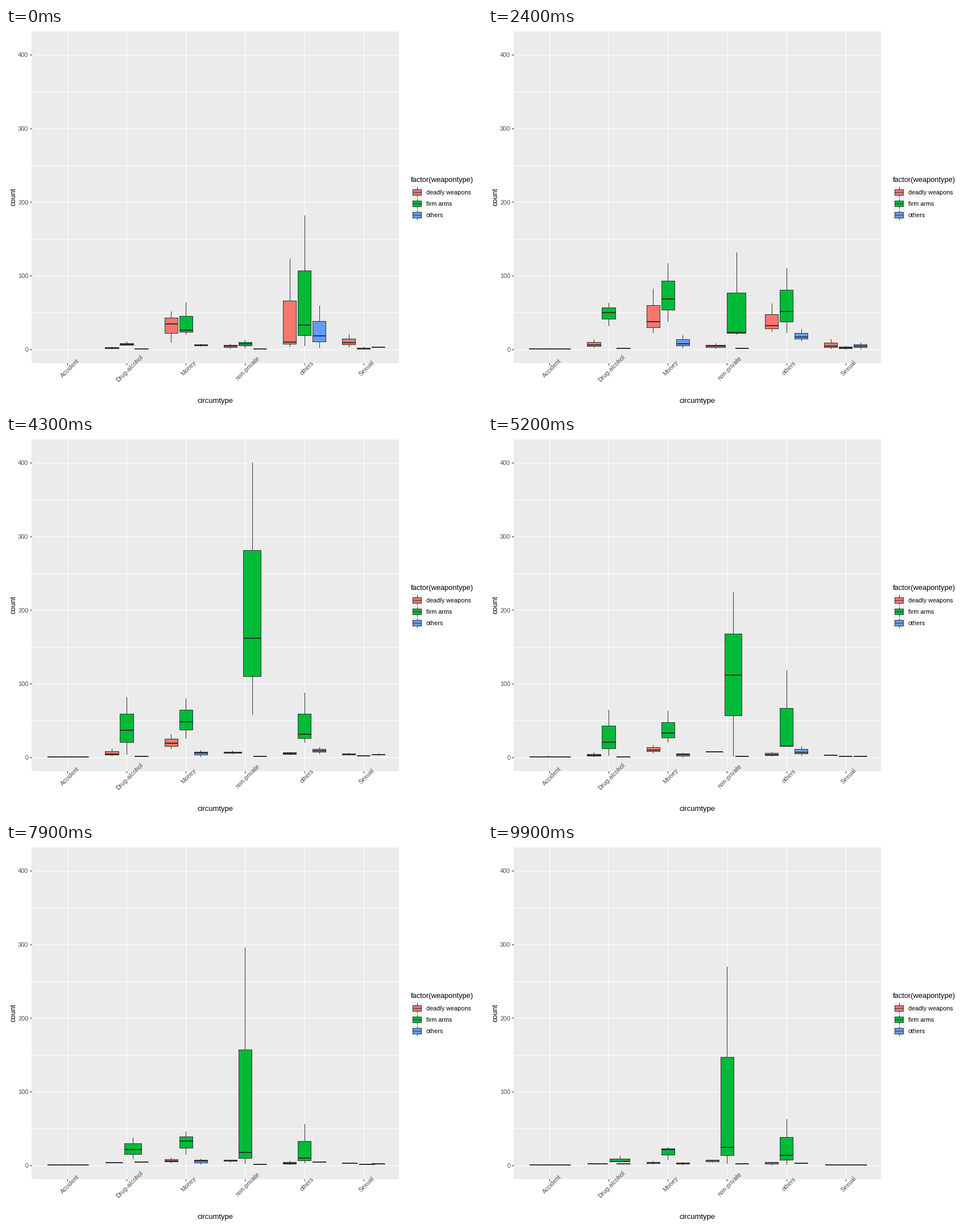
A matplotlib script for the animation above (10000 ms loop, 837 by 669 pixels).

```python
import numpy as np
import matplotlib.pyplot as plt
from matplotlib.animation import FuncAnimation
from matplotlib.patches import Rectangle

W, H, DPI = 837, 669, 72
FRAMES, STEP = 100, 100
plt.rcParams["font.family"] = "Liberation Sans"

INK, GREY = "#333333", "#4D4D4D"
FILLS = ["#F8766D", "#00BA38", "#619CFF"]
CATS = ["Accident", "Drug-alcohol", "Money", "non-private", "others", "Sexual"]
KINDS = ["deadly weapons", "firm arms", "others"]
RED, GREEN, BLUE = range(3)

# Dodged offsets for three, two or one box sharing a category
FULL = 70.3
OFFSETS = [(-26, -19.5, 0), (0, 19.5, 19.5), (26, 26, 26)]
WIDTHS = [(FULL / 3, FULL / 2, FULL), (FULL / 3, FULL / 2, FULL / 2), (FULL / 3,) * 3]

fig = plt.figure(figsize=((W + 1e-6) / DPI, (H + 1e-6) / DPI), dpi=DPI, facecolor="white")
ax = fig.add_axes([0, 0, 1, 1])
# The half-pixel shift makes snapped strokes land on pixel centres
ax.set(xlim=(0.5, W + 0.5), ylim=(H - 0.5, -0.5))
ax.axis("off")


def cat_x(i):
    return 108.5 + 104.13 * i


def val_y(v):
    return 565.5 - 1.2975 * v


def tween(keys):
    """Value in every frame from a constant or from {frame: value}."""
    if not isinstance(keys, dict):
        keys = {0: keys}
    return np.interp(np.arange(FRAMES), list(keys), list(keys.values()))


def line(xs, ys, color=INK, lw=1, z=2):
    return ax.plot(xs, ys, color=color, lw=lw, zorder=z, antialiased=False,
                   solid_capstyle="butt", snap=True)[0]


def rect(x, y, w, h, fill, edge="none", z=1):
    return ax.add_patch(Rectangle((x, y), w, h, fc=fill, ec=edge, lw=1, zorder=z,
                                  antialiased=False, snap=True, joinstyle="miter"))


def label(x, y, s, size, color="black", **kw):
    ax.text(x + 0.5, y - 0.5, s, fontsize=size, color=color, zorder=60, **kw)


def draw_panel():
    rect(45.3, 5.7, 646, 584, "#EBEBEB", z=0)
    for v in range(0, 401, 50):
        line([45, 691], [val_y(v)] * 2, "white", z=1)
    for v in range(0, 401, 100):
        line([42.5, 45.5], [val_y(v)] * 2)
        label(39.3, val_y(v) + 4.5, str(v), 11, GREY, ha="right", va="baseline")
    for i, name in enumerate(CATS):
        x = cat_x(i)
        line([x, x], [6, 590], "white", z=1)
        line([x, x], [589.5, 592.5])
        label(x + 4.5, 599.5, name, 10.8, GREY, rotation=45, ha="center", va="center")
    label(368, 660, "circumtype", 13, ha="center", va="baseline")
    label(13.7, 297.5, "count", 13, rotation=90, ha="center", va="center")


def draw_legend():
    label(711.7, 271, "factor(weapontype)", 12.9, va="baseline")
    for i, (name, fill) in enumerate(zip(KINDS, FILLS)):
        y = 288.5 + 20.2 * i
        rect(713.3, y - 10.8, 20, 20.5, "#F2F2F2")
        line([723.5] * 2, [y - 8.5, y + 8])
        rect(715.5, y - 5, 15, 10, fill, INK, z=3)
        line([715.5, 730.5], [y, y], z=4)
        label(738.7, y + 4.2, name, 10.8, va="baseline")


class Box:
    """Box plot of three counts: high, and middle and low as fractions of it."""

    def __init__(self, cat, kind, high, mid=1, low=1, crowd=0, start=0, end=FRAMES):
        hi = np.maximum(1, tween(high))
        med = np.maximum(1, hi * tween(mid))
        lo = np.minimum(med, np.maximum(1, hi * tween(low)))
        self.y = val_y(np.array([lo, (lo + med) / 2, med, (med + hi) / 2, hi])).T
        share = tween(crowd)
        self.x = cat_x(cat) + np.interp(share, range(3), OFFSETS[kind])
        self.w = np.interp(share, range(3), WIDTHS[kind])
        self.start, self.end = start, end
        z = 10 + 6 * cat + 2 * kind
        self.whisk = [line([0, 0], [0, 0], z=z) for _ in range(2)]
        self.body = rect(0, 0, 1, 1, FILLS[kind], INK, z=z + 0.5)
        self.mid = line([0, 0], [0, 0], lw=2, z=z + 1)

    def show(self, f):
        for a in (*self.whisk, self.body, self.mid):
            a.set_visible(self.start <= f < self.end)
        lo, q1, med, q3, hi = self.y[f]
        x, w = self.x[f], self.w[f]
        self.whisk[0].set_data([x, x], [q1, lo])
        self.whisk[1].set_data([x, x], [q3, hi])
        self.body.set_bounds(x - w / 2, q3, w, q1 - q3)
        self.mid.set_data([x - w / 2, x + w / 2], [med, med])


draw_panel()
draw_legend()

accident = {14: 1, 33: 1.95, 52: 1.9, 67: 1, 79: 1.95}
drug = {52: 0, 99: 1}
public = {0: 0, 14: 1, 33: 0.7, 52: 0.55, 67: 0}
sexual = {67: 0, 79: 0.3, 99: 1.95}

boxes = [
    Box(0, RED, {33: 1, 52: 2.5, 67: 2, 79: 1}, 0.4, 0.4, accident, start=3),
    Box(0, GREEN, {52: 1, 67: 2, 79: 1}, crowd=accident, start=3),

    Box(1, RED, {0: 4, 14: 8, 33: 18.5, 52: 7, 67: 2.5, 79: 4, 99: 2.5},
        {14: 0.6, 33: 0.33, 52: 0.4, 67: 0.9}, {52: 0.2, 67: 0.9}, drug),
    Box(1, GREEN, {0: 11, 14: 23, 33: 100, 52: 65, 67: 34, 79: 38, 99: 13},
        {0: 0.6, 14: 1, 33: 0.6, 52: 0.32, 67: 0.32, 79: 0.57, 99: 0.42},
        {0: 0.55, 14: 1, 33: 0.07, 52: 0.05, 99: 0.38}, drug),
    Box(1, BLUE, {0: 1, 14: 2, 52: 1, 67: 2, 79: 4.5, 99: 2}),

    Box(2, RED, {0: 52, 14: 121, 33: 48.5, 52: 17, 99: 6},
        {0: 0.67, 14: 0.29, 33: 0.6}, {0: 0.2, 14: 0.17, 33: 0.38}),
    Box(2, GREEN, {0: 64, 14: 137, 33: 100, 52: 63, 67: 50, 79: 46, 99: 25},
        {0: 0.41, 14: 0.46, 33: 0.7, 52: 0.52, 99: 0.86}, 0.33),
    Box(2, BLUE, {0: 8, 14: 25, 33: 14.5, 52: 6, 79: 9, 99: 4.5},
        {0: 0.7, 14: 0.28, 52: 0.7}, {0: 0.6, 14: 0.12, 99: 0.25}),

    Box(3, RED, {0: 8, 14: 6, 33: 10, 52: 8}, {33: 0.55, 52: 1, 99: 0.85},
        {33: 0.17, 52: 1, 67: 0.55}, public),
    Box(3, GREEN, {0: 13, 14: 53, 33: 202, 39: 391, 48: 411, 52: 224, 60: 391, 67: 350,
                   72: 371, 79: 296, 83: 314, 88: 262, 99: 270},
        {0: 0.6, 14: 0.04, 33: 0.3, 52: 0.5, 67: 0.63, 79: 0.06, 99: 0.09},
        {0: 0.2, 14: 0, 33: 0.3, 52: 0.01, 67: 0.63, 79: 0.01}, public),
    Box(3, BLUE, {0: 1, 99: 2}),

    Box(4, RED, {14: 123, 33: 8.5, 99: 5}, {14: 0.08, 33: 0.9, 67: 0.3, 99: 0.7},
        {14: 0.04, 33: 0.7, 60: 0.2}),
    Box(4, GREEN, {0: 182, 6: 391, 11: 273, 14: 174, 33: 53, 52: 119, 67: 75, 79: 56, 99: 63},
        {0: 0.18, 14: 0.31, 33: 0.61, 52: 0.13, 99: 0.22},
        {0: 0.03, 14: 0.06, 33: 0.35, 52: 0.14, 99: 0.02}),
    Box(4, BLUE, {0: 59, 14: 45, 33: 12, 52: 15.5, 79: 5.5, 99: 3},
        {0: 0.31, 14: 0.28, 33: 0.92, 52: 0.45, 79: 0.9},
        {0: 0.05, 14: 0.24, 33: 0.6, 52: 0.2, 79: 0.9}),

    Box(5, RED, {0: 20.5, 14: 18.5, 33: 9, 52: 3.5, 67: 4.5, 99: 1},
        {0: 0.45, 14: 0.16, 33: 0.55, 52: 0.9}, {0: 0.2, 14: 0.05, 33: 0.2, 52: 0.9}, sexual),
    Box(5, GREEN, {0: 4, 14: 5, 33: 5, 52: 1.5, 99: 1}, {0: 0.25, 14: 0.6, 33: 0.3, 52: 1},
        {33: 0.2, 52: 1}, sexual),
    Box(5, BLUE, {0: 4, 14: 8, 33: 10, 52: 1.5, 79: 2.5},
        {14: 0.7, 33: 0.35, 52: 1}, {0: 0.75, 14: 0.12, 33: 0.1, 52: 1}, end=97),
]


def update(f):
    for b in boxes:
        b.show(f)
    return []


anim = FuncAnimation(fig, update, frames=FRAMES, interval=STEP, repeat=True, repeat_delay=0)
plt.show()
```
